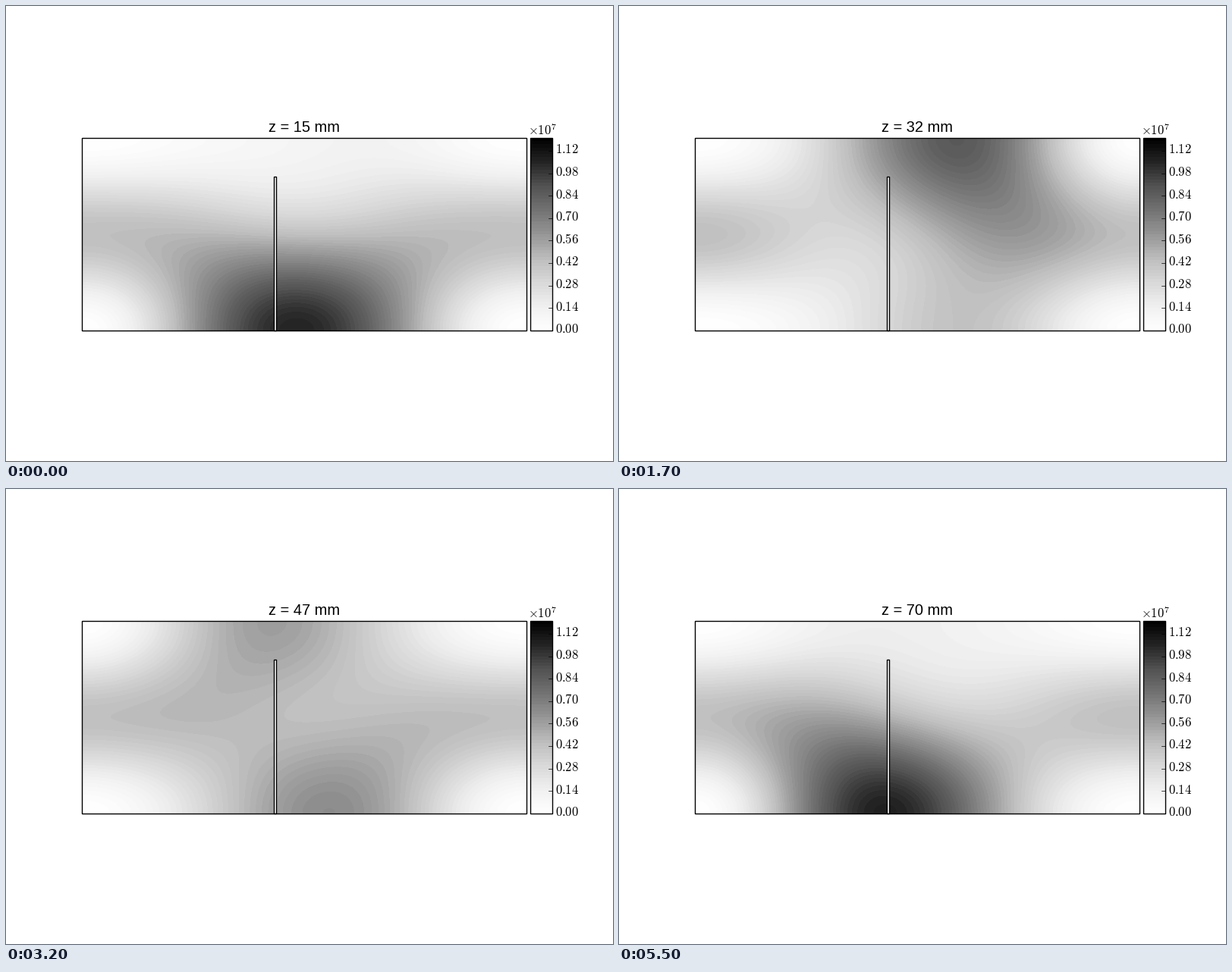
A matplotlib script for the animation above (5.6 s loop, 800 by 600 pixels).

```python
import numpy as np
import matplotlib.pyplot as plt
from matplotlib.animation import FuncAnimation
from matplotlib.patches import Rectangle

plt.rcParams["mathtext.fontset"] = "cm"

FRAMES, INTERVAL = 56, 100
Z_START = 15                      # mm
LEFT, RIGHT, TOP, BOTTOM = 100, 686, 174, 428
BAR_LEFT, BAR_RIGHT = 691, 720
LEVELS, STEP = 60, 0.02

# mode amplitudes of the guided field
A10, A11, A20, AX = 0.66, 0.38, 0.15, 0.66

u = (np.arange(586) + 0.5) / 586
v = ((np.arange(254) + 0.5) / 254)[::-1, None]
SIN1, SIN2 = np.sin(np.pi * u), np.sin(2 * np.pi * u)
COSV = np.cos(np.pi * v)
EX2 = (AX * np.cos(np.pi * u) * np.sin(np.pi * v)) ** 2


def intensity(z):
    """Squared field of three beating modes at distance z."""
    phi = np.radians(86 + 13.3 * (z - 20))
    psi = np.radians(64 + 5.8 * (z - 42))
    ey = SIN1 * (A10 + A11 * np.exp(1j * phi) * COSV)
    ey = ey - A20 * np.exp(1j * psi) * SIN2
    return EX2 + np.abs(ey) ** 2


def banded(values):
    band = np.clip(np.floor(values / STEP), 0, LEVELS - 1)
    return (band + 0.5) / LEVELS


def outline(x0, y0, x1, y1, z, face="none", lw=1.0):
    ax.add_patch(Rectangle((x0, y0), x1 - x0, y1 - y0, facecolor=face,
                           edgecolor="black", lw=lw, zorder=z))


def gray_image(data, x0, x1):
    return ax.imshow(data, extent=(x0, x1, BOTTOM, TOP), cmap="Greys",
                     vmin=0, vmax=1, interpolation="nearest",
                     aspect="auto", zorder=1)


fig = plt.figure(figsize=(8, 6), dpi=100, facecolor="white")
ax = fig.add_axes([0, 0, 1, 1])

field = gray_image(banded(intensity(Z_START)), LEFT, RIGHT)
ramp = (np.arange(LEVELS)[::-1, None] + 0.5) / LEVELS
gray_image(ramp, BAR_LEFT, BAR_RIGHT)

outline(353, 225, 356, BOTTOM, 2, face="white")
outline(LEFT, TOP, RIGHT, BOTTOM, 3)
outline(BAR_LEFT, TOP, BAR_RIGHT, BOTTOM, 3)

for k in range(9):
    y = BOTTOM - 7 * k * (BOTTOM - TOP) / LEVELS
    ax.plot([BAR_RIGHT - 5.5, BAR_RIGHT], [y, y], color="black", lw=0.5,
            zorder=4)
    ax.text(724.5, y + 3.4, f"${0.14 * k:.2f}$", fontsize=12,
            ha="left", va="baseline")
ax.text(688, 170, r"$\times 10^{7}$", fontsize=12, ha="left", va="baseline")

title = ax.text(393, 166, "", fontsize=14.4, family="Liberation Sans",
                ha="center", va="baseline")

ax.set_xlim(0, 800)
ax.set_ylim(600, 0)
ax.axis("off")


def update(i):
    z = Z_START + i
    field.set_data(banded(intensity(z)))
    title.set_text(f"z = {z} mm")
    return field, title


anim = FuncAnimation(fig, update, frames=FRAMES, interval=INTERVAL,
                     repeat=True, repeat_delay=0)
plt.show()
```
